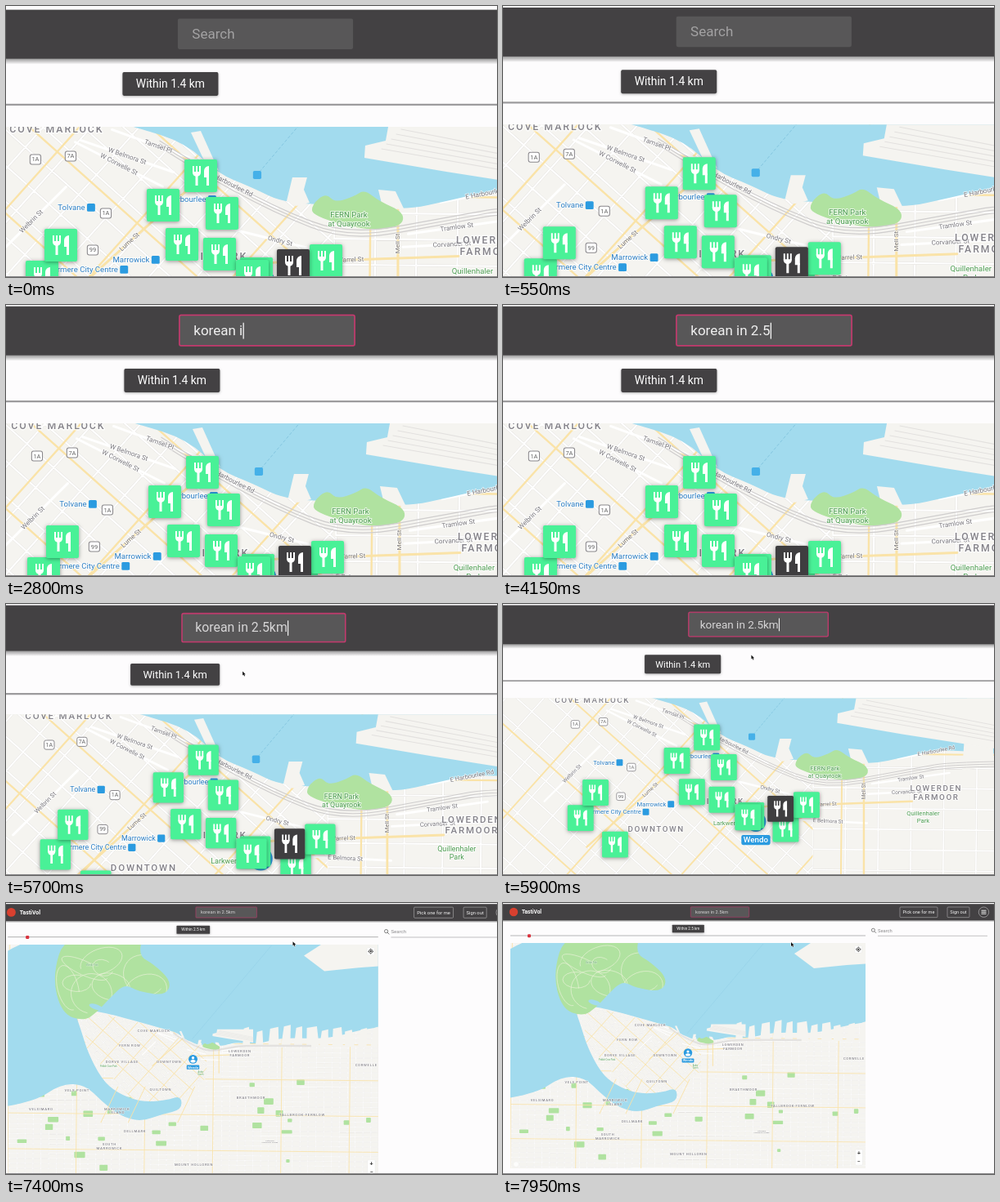
Animation of 600 by 332 pixels, one loop 8000 ms. Source, as an HTML page with a canvas:

```html
<!DOCTYPE html>
<html lang="en">
<head>
<meta charset="utf-8">
<title>Map search</title>
<style>
html, body { margin: 0; width: 100%; height: 100%; overflow: hidden; background: #fdfdfd; }
canvas { display: block; width: 600px; height: 332px; }
</style>
</head>
<body>
<canvas id="stage" width="600" height="332"></canvas>
<script>
const ctx = document.getElementById('stage').getContext('2d');
const LOOP = 8000, FOCUS = 800, ZOOM_OUT = 5515, SUBMIT = 6000, LOADED = 6600;
const LAND = '#f5f4f0', WATER = '#a2dbee', PARK = '#b0e2a0', ROAD = '#fae3a8', BLUE = '#2b9be0', DARK = '#434143';
const HOME = { x: 226, y: 185 };
const QUERY = 'korean in 2.5km';

const mix = (a, b, p) => a + (b - a) * p;
const ease = p => (p = Math.min(1, Math.max(0, p)), p * p * (3 - 2 * p));
// Critically damped spring, scaled to arrive exactly at the end of the loop.
const spring = ms => ms <= 0 ? 0 : 1 - (1 + 0.00287 * ms) * Math.exp(-0.00287 * ms);
const zoomOut = t => spring(t - ZOOM_OUT) / spring(LOOP - 50 - ZOOM_OUT);
// Steady typing with a pause before the number and before the unit.
const keyTime = i => 1600 + 165 * i + 350 * ((i > 9) + (i > 12));

function seeded(seed) {
  return () => (seed = (seed * 16807) % 2147483647) / 2147483647;
}
const pairs = s => s.split(' ').map(p => p.split(',').map(Number));
// Street-level places are plotted on a finer grid than the city.
const fine = (x, y) => [180 + (x - 64) / 5.46, 150 + (y - 148) / 5.46];
const finePairs = s => pairs(s).map(p => fine(...p));

const inlet = [
  ...pairs('-40,20 480,20 480,142 425,148 385,160 330,158 300,166'),
  ...finePairs('600,222 545,235 490,247 440,240 345,240 300,218 262,203 222,165 160,145'),
  ...pairs('128,130 104,126 86,124 95,150 103,176 119,207 137,223 165,234 195,232 212,226 213,243 190,248'),
  ...pairs('165,257 140,250 118,232 100,214 72,212 40,234 -40,246')
];
const forest = pairs('77,35 61,86 72,130 98,139 114,128 128,112 146,95 162,104 194,109 201,92 180,72 162,62 168,35');
const northShore = pairs('356,62 376,49 480,40 480,72 420,76 380,80');
const port = finePairs('470,140 466,162 441,168 440,183 540,200 700,225 700,140');
const quayPark = finePairs('376,254 376,240 393,226 404,238 428,230 440,222 458,236 489,250 485,268 440,272');
const oldTown = pairs('100,125 160,140 200,148 242,166 242,205 215,230 160,236 100,170');
const railway = finePairs('150,140 230,192 330,247 420,282 540,260 640,242 1500,250');

// name, x, y, angle, main road
const streets = [
  ['W Belmora St', 150, 181, 19], ['W Corwelle St', 140, 191, 27], ['Tamsel Pl', 188, 169, 20],
  ['Harbourlee Rd', 280, 217, 27], ['E Harbourlee Rd', 592, 226, -11], ['Welbrin St', 33, 261, -45],
  ['Lume St', 153, 286, -42, true], ['Ondry St', 337, 285, 14], ['Varrel St', 424, 308, -2, true],
  ['Tramlow St', 553, 268, -8], ['Corvander St', 547, 289, -3], ['E Belmora St', 426, 334, 3],
  ['Mell St', 481, 288, -90, true]
];
const places = {
  zone: [['COVE MARLOCK', 64, 148], ['MIDMARK', 262, 304], ['LOWERDEN|FARMOOR', 592, 284], ['DOWNTOWN', 162, 347]],
  park: [['FERN Park|at Quayrook', 421, 253], ['Quillenhaler|Park', 572, 322], ['Larkwen Square', 284, 338]],
  stop: [['Tolvane', 82, 244], ['Marrowick', 155, 308], ['Ostermere City Centre', 92, 320], ['Harbourlee', 223, 234]],
  badge: [['1A', 38, 185], ['7A', 81, 181], ['1A', 124, 251], ['99', 108, 296]]
};
const districts = [
  ['COVE MARLOCK', 180, 150], ['FERN ROW', 152, 168], ['DORVE VILLAGE', 143, 187], ['DOWNTOWN', 198, 187],
  ['LOWERDEN|FARMOOR', 281, 174], ['QUILTOWN', 188, 219], ['VELS POINT', 90, 220], ['VELSIMARO', 48, 242],
  ['MARROWICK|ISLAND', 137, 242], ['DELLMARK', 158, 268], ['SOUTH|MARROWICK', 128, 284],
  ['MOUNT HOLLOREN', 227, 308], ['BRAETHMOOR', 294, 229], ['TALLBROOK-FERNLOW', 354, 249], ['CORWELLE', 429, 191]
];
const landmarks = [['Brindle Park', 108, 73, 'park'], ['Pebble Cove Park', 127, 192, 'park'],
  ['Andry|Green', 235, 199, 'park'], ['Ostermere|Community College', 316, 279, 'road']];
const styles = {
  zone: { color: '#85838a', size: 4.1, weight: 500, spacing: 0.16 },
  road: { color: '#77757a', size: 2.7 },
  park: { color: '#4c9c50', size: 3.2 },
  stop: { color: '#2c7fc4', size: 3.2 }
};
const diners = pairs('361,346 99,370 46,329 69,290 240,205 194,241 266,251 217,289 263,301 308,325 303,328 393,309');

function trace(points, closed) {
  ctx.beginPath();
  points.forEach(([x, y]) => ctx.lineTo(x, y));
  if (closed) ctx.closePath();
}
// Rounds a line off through the midpoints of its key points.
function bend(points, closed) {
  const all = closed ? [...points, points[0], points[1]] : points;
  const mid = i => [(all[i][0] + all[i + 1][0]) / 2, (all[i][1] + all[i + 1][1]) / 2];
  ctx.beginPath();
  ctx.moveTo(...mid(0));
  for (let i = 1; i < all.length - 1; i++) ctx.quadraticCurveTo(...all[i], ...mid(i));
}
function paint(color) { ctx.fillStyle = color; ctx.fill(); }
function ink(color, width) { ctx.strokeStyle = color; ctx.lineWidth = width; ctx.stroke(); }
function fill(points, color) { trace(points, true); paint(color); }
function stroke(points, color, width) { trace(points); ink(color, width); }
function box(x, y, w, h, r, color, edge, width = 0.5) {
  ctx.beginPath(); ctx.roundRect(x, y, w, h, r);
  if (color) paint(color);
  if (edge) ink(edge, width);
}
function disc(x, y, r, color) { ctx.beginPath(); ctx.arc(x, y, r, 0, 7); paint(color); }
// Set large and scaled down, so tiny sizes keep exact spacing.
function text(s, x, y, { size, color, align = 'left', angle = 0, weight = 400, spacing = 0, halo }) {
  ctx.save();
  ctx.translate(x, y); ctx.rotate(angle * Math.PI / 180); ctx.scale(size / 40, size / 40);
  ctx.font = weight + ' 40px Roboto, sans-serif';
  ctx.letterSpacing = spacing * 40 + 'px';
  ctx.textAlign = align; ctx.textBaseline = 'middle';
  ctx.strokeStyle = halo; ctx.lineWidth = 9; ctx.lineJoin = 'round'; ctx.fillStyle = color;
  s.split('|').forEach((line, i) => {
    if (halo) ctx.strokeText(line, 0, i * 46);
    ctx.fillText(line, 0, i * 46);
  });
  const width = ctx.measureText(s).width * size / 40;
  ctx.restore();
  return width;
}

function grid(center, angle, reach, dx, dy, color, width) {
  ctx.save();
  ctx.translate(center.x, center.y); ctx.rotate(angle);
  ctx.beginPath();
  for (let x = -reach; x <= reach; x += dx) { ctx.moveTo(x, -reach); ctx.lineTo(x, reach); }
  for (let y = -reach; y <= reach; y += dy) { ctx.moveTo(-reach, y); ctx.lineTo(reach, y); }
  ink(color, width);
  ctx.restore();
}
function blocks(center, angle, reach, dx, dy, unit) {
  grid(center, angle, reach, dx, dy, '#e5e3e0', unit);
  grid(center, angle, reach, dx, dy, '#fff', 0.7 * unit);
}
function drawStreet([, x, y, angle, main], unit) {
  const [cx, cy] = fine(x, y), a = angle * Math.PI / 180;
  const reach = main ? 24 : 11, dx = reach * Math.cos(a), dy = reach * Math.sin(a);
  stroke([[cx - dx, cy - dy], [cx + dx, cy + dy]], main ? ROAD : '#fff', unit);
}
function drawPiers() {
  const random = seeded(11);
  for (let x = 284; x < 443; x += 15) {
    const w = 6 + random() * 7, top = 143 + random() * 10, lean = random() * 5;
    fill([[x, 170], [x + lean, top], [x + lean + w, top - 2], [x + w + 3, 168]], LAND);
  }
  fill(finePairs('345,236 352,207 370,207 366,222 373,238 357,242'), LAND);
  fill(finePairs('457,222 478,224 489,247 462,243'), LAND);
  fill(finePairs('228,152 240,150 262,199 244,186'), LAND);
}
function drawGround(zoom) {
  const unit = 1 / zoom, random = seeded(5);
  ctx.lineJoin = ctx.lineCap = 'round';
  ctx.fillStyle = LAND; ctx.fillRect(-300, -300, 1200, 1000);
  blocks(HOME, 0.01, 260, 9.2, 5.8, unit);
  for (let i = 0; i < 30; i++) {
    box(20 + random() * 410, 200 + random() * 118, 4 + random() * 9, 3 + random() * 5, 0.8, PARK);
  }
  grid({ x: 250, y: 191 }, 0.01, 320, 80, 42, ROAD, 0.8 * unit);
  ctx.save();
  trace(oldTown, true); ctx.clip();
  ctx.fillStyle = LAND; ctx.fillRect(0, 0, 600, 400);
  blocks({ x: 190, y: 180 }, 0.73, 110, 8, 6, unit);
  grid({ x: 190, y: 180 }, 0.73, 120, 24, 18, ROAD, 0.8 * unit);
  ctx.restore();
  streets.forEach(s => drawStreet(s, unit));

  bend(inlet, true); paint(WATER);
  drawPiers();
  fill(port, LAND);
  for (let d = 6; d < 36; d += 6) stroke(finePairs(`${455 + d},${178 - d} 700,${220 - d}`), '#e3e1df', 0.4 * unit);
  fill(northShore, LAND);
  bend(quayPark, true); paint(PARK);
  bend(forest, true); paint(PARK);
  ctx.save();
  ctx.clip();
  for (let i = 0; i < 9; i++) {
    ctx.beginPath();
    ctx.ellipse(75 + random() * 100, 50 + random() * 70, 12 + random() * 18, 8 + random() * 16, random() * 3, 0, 5);
    ink('#f1f3df', 0.6 * unit);
  }
  ctx.restore();
  ctx.beginPath(); ctx.ellipse(112, 122, 8, 3, 0.3, 0, 7); paint(WATER);
  for (const x of [118, 150, 208]) stroke([[x, 258], [x + 20, 216]], ROAD, 0.9 * unit);
  for (const d of [-0.7, 0, 0.7]) { bend(railway.map(([x, y]) => [x, y + d])); ink('#cfcdcd', 0.4 * unit); }
  ctx.setLineDash([unit, unit]);
  stroke([fine(312, 200), [318, 50]], '#80c3de', 0.3 * unit);
  ctx.setLineDash([]);
}

function drawDiner(x, y, color) {
  ctx.save();
  ctx.translate((x + 476) / 3, (y + 2) / 3); ctx.scale(1 / 3, 1 / 3);
  ctx.shadowColor = 'rgba(0,0,0,.4)'; ctx.shadowBlur = 5; ctx.shadowOffsetY = 1;
  box(-20, -20, 40, 40, 2, color);
  ctx.shadowColor = 'transparent';
  ctx.lineCap = 'butt';
  for (const prong of [-9, -5, -1]) stroke([[prong, -12], [prong, -4]], '#fff', 2);
  box(-10, -5, 10, 6, [0, 0, 5, 5], '#fff');
  box(-6.5, 0, 3, 12, 0, '#fff');
  box(4, -12, 6, 14, [6, 0, 0, 0], '#fff');
  box(7, 0, 3, 12, 0, '#fff');
  ctx.restore();
}
function drawUser(x, y) {
  disc(x, y - 1.5, 5.2, BLUE);
  disc(x, y - 3, 1.6, '#fff');
  ctx.beginPath(); ctx.ellipse(x, y + 0.9, 3, 1.7, 0, 0, 7); paint('#fff');
  box(x - 7.4, y + 5.4, 14.8, 5.1, 0.9, BLUE);
  text('Wendo', x, y + 8.1, { size: 4.1, color: '#fff', align: 'center', weight: 500 });
}
function drawMapButtons() {
  box(430, 52.5, 8.6, 8.6, 0.8, '#fff', '#ddd', 0.3);
  ctx.beginPath(); ctx.arc(434.3, 56.8, 2.2, 0, 7); ink('#333', 0.65);
  for (const d of [-2.7, 2.7]) {
    disc(434.3 + d, 56.8, 0.5, '#333');
    disc(434.3, 56.8 + d, 0.5, '#333');
  }
  disc(434.3, 56.8, 1.1, '#333');
  box(430.5, 302, 9, 19, 1, '#fff', '#ddd', 0.3);
  text('+', 435, 307, { size: 7, color: '#333', align: 'center', weight: 500 });
  text('−', 435, 316.6, { size: 7, color: '#333', align: 'center', weight: 500 });
  disc(16, 320, 2.8, 'rgba(255,255,255,.8)');
}
function drawMap(t) {
  const p = ease((t - SUBMIT) / 450), zoom = mix(1.82, 1, p);
  const ax = mix(263.7, HOME.x, p), ay = mix(113.7, HOME.y, p);
  const searched = t >= SUBMIT, loading = searched && t < LOADED;
  const place = (x, y) => [ax + zoom * (x - HOME.x), ay + zoom * (y - HOME.y)];
  const label = (s, [x, y], kind, shrink = 1, angle = 0) => {
    const style = styles[kind], size = style.size * shrink;
    const w = text(s, x, y, { ...style, size, angle, align: 'center', halo: 'rgba(255,255,255,.7)' });
    if (kind === 'stop') box(x + w / 2 + 0.8, y - 1.7, 3.3, 3.3, 0.5, BLUE);
  };
  ctx.save();
  ctx.beginPath(); ctx.rect(9, 49, 434, 276); ctx.clip();
  ctx.fillStyle = '#e1dfdc'; ctx.fillRect(9, 49, 434, 276);
  ctx.save();
  ctx.translate(ax, ay); ctx.scale(zoom, zoom); ctx.translate(-HOME.x, -HOME.y);
  if (loading) { ctx.beginPath(); ctx.rect(60, 147.7, 298, 170); ctx.clip(); }
  drawGround(zoom);
  ctx.restore();

  if (searched) {
    const shown = ([, x, y]) => !loading || (y > 149 && x < 358);
    landmarks.filter(shown).forEach(([s, x, y, kind]) => label(s, place(x, y), kind, 0.8));
    districts.filter(shown).forEach(([s, x, y]) => label(s, place(x, y), 'zone', loading ? 0.76 : 1));
  } else {
    streets.forEach(([s, x, y, angle]) => label(s, place(...fine(x, y)), 'road', 1, angle));
    for (const kind in styles) {
      (places[kind] || []).forEach(([s, x, y]) => label(s, place(...fine(x, y)), kind));
    }
    places.badge.forEach(([s, x, y]) => {
      const [bx, by] = place(...fine(x, y));
      box(bx - 2.2, by - 2, 4.4, 4, 0.8, '#fff', '#8a888c', 0.35);
      text(s, bx, by + 0.1, { size: 2.5, color: '#666', align: 'center' });
    });
    const [fx, fy] = place(...fine(309, 204));
    box(fx - 1.7, fy - 1.7, 3.4, 3.4, 0.6, '#45b0e8');
  }
  drawUser(ax, ay);
  if (!searched) {
    diners.forEach(([x, y]) => drawDiner(x, y, '#49f197'));
    drawDiner(353, 315, '#3f3e40');
  }
  drawMapButtons();
  ctx.restore();
}

function drawHeader() {
  const shade = ctx.createLinearGradient(0, 21, 0, 23.5);
  shade.addColorStop(0, 'rgba(0,0,0,.42)'); shade.addColorStop(1, 'rgba(0,0,0,0)');
  ctx.fillStyle = shade; ctx.fillRect(0, 21, 600, 2.5);
  ctx.fillStyle = DARK; ctx.fillRect(0, 1.2, 600, 20);
  disc(13, 11, 5.2, '#d8402f');
  text('TastiVol', 23, 11.3, { size: 6.6, color: '#fff', weight: 700 });
  const button = (s, x, w) => {
    box(x, 5, w, 12.6, 1, null, '#c4c3c4');
    text(s, x + w / 2, 11.4, { size: 5.6, color: '#f2f2f2', align: 'center' });
  };
  button('Pick one for me', 485, 46);
  button('Sign out', 543, 27);
  ctx.beginPath(); ctx.arc(587.5, 11.2, 6.2, 0, 7); ink('#c4c3c4', 0.6);
  for (const d of [-2, 0, 2]) stroke([[584.5, 11.2 + d], [590.5, 11.2 + d]], '#fff', 0.9);
}
function drawSearch(t) {
  const focused = t >= FOCUS;
  const typed = [...QUERY].filter((_, i) => keyTime(i) <= t).length;
  box(229.3, 4.8, 71.4, 12.5, 0.7, '#585758', focused && '#c43a6e', 0.55);
  const type = { size: 5.67, color: typed ? (t > ZOOM_OUT ? '#d6d5d6' : '#f0f0f0') : '#a3a2a3' };
  const width = text(typed ? QUERY.slice(0, typed) : 'Search', 235.1, 11.3, type);
  const since = t - (typed ? keyTime(typed - 1) : FOCUS);
  if (focused && t < SUBMIT && since % 1000 < 500) {
    ctx.fillStyle = '#fff'; ctx.fillRect(235.2 + (typed && width), 7.9, 0.4, 6.6);
  }
}
function drawControls(t) {
  stroke([[9, 40], [443, 40]], '#9c9b9d', 0.75);
  box(30, 38.3, 4, 4, 1.2, '#d9333f');
  ctx.save();
  ctx.shadowColor = 'rgba(0,0,0,.3)'; ctx.shadowBlur = 3; ctx.shadowOffsetY = 1;
  box(206.8, 26.7, 39, 9.6, 0.6, DARK);
  ctx.restore();
  text(`Within ${t < SUBMIT ? '1.4' : '2.5'} km`, 226.3, 31.7, { size: 4.62, color: '#fff', align: 'center' });
  ctx.beginPath(); ctx.arc(452.4, 33.2, 2, 0, 7); ink('#666', 0.8);
  stroke([[453.9, 34.7], [456, 36.8]], '#666', 0.8);
  text('Search', 458, 34.2, { size: 5.8, color: '#8d8c8e' });
  stroke([[458, 40.3], [592, 40.3]], '#9c9b9d', 0.6);
}
function drawPointer(t) {
  const p = zoomOut(t);
  if (t > FOCUS && t < keyTime(0)) stroke([[277, 13], [277, 21]], 'rgba(30,30,30,.6)', 1);
  if (!p) return;
  ctx.save();
  ctx.translate(mix(282, 352, p), mix(95, 48, p) - 85 * p * (1 - p));
  trace(pairs('0,0 0,5 1.2,4 2.1,6 3,5.6 2.1,3.8 3.7,3.7'), true);
  ink('#fff', 1); paint('#111');
  ctx.restore();
}

function draw(t) {
  const p = zoomOut(t), scale = mix(3, 1, p);
  const drift = Math.exp(-t / 230);
  const panX = -476 * (1 - p) * (1 - 0.31 * p * p) - 2 * drift;
  const panY = 1 - scale + 3 * drift;
  ctx.setTransform(1, 0, 0, 1, 0, 0);
  ctx.fillStyle = '#fdfcfd'; ctx.fillRect(0, 0, 600, 332);
  ctx.setTransform(scale, 0, 0, scale, panX, panY);
  drawMap(t);
  drawHeader();
  drawSearch(t);
  drawControls(t);
  ctx.setTransform(1, 0, 0, 1, 0, 0);
  ctx.fillStyle = '#8b8a8c'; ctx.fillRect(0, 331, 600, 1);
  drawPointer(t);
}

const start = performance.now();
function tick() {
  draw((performance.now() - start) % LOOP);
  requestAnimationFrame(tick);
}
tick();
</script>
</body>
</html>
```
